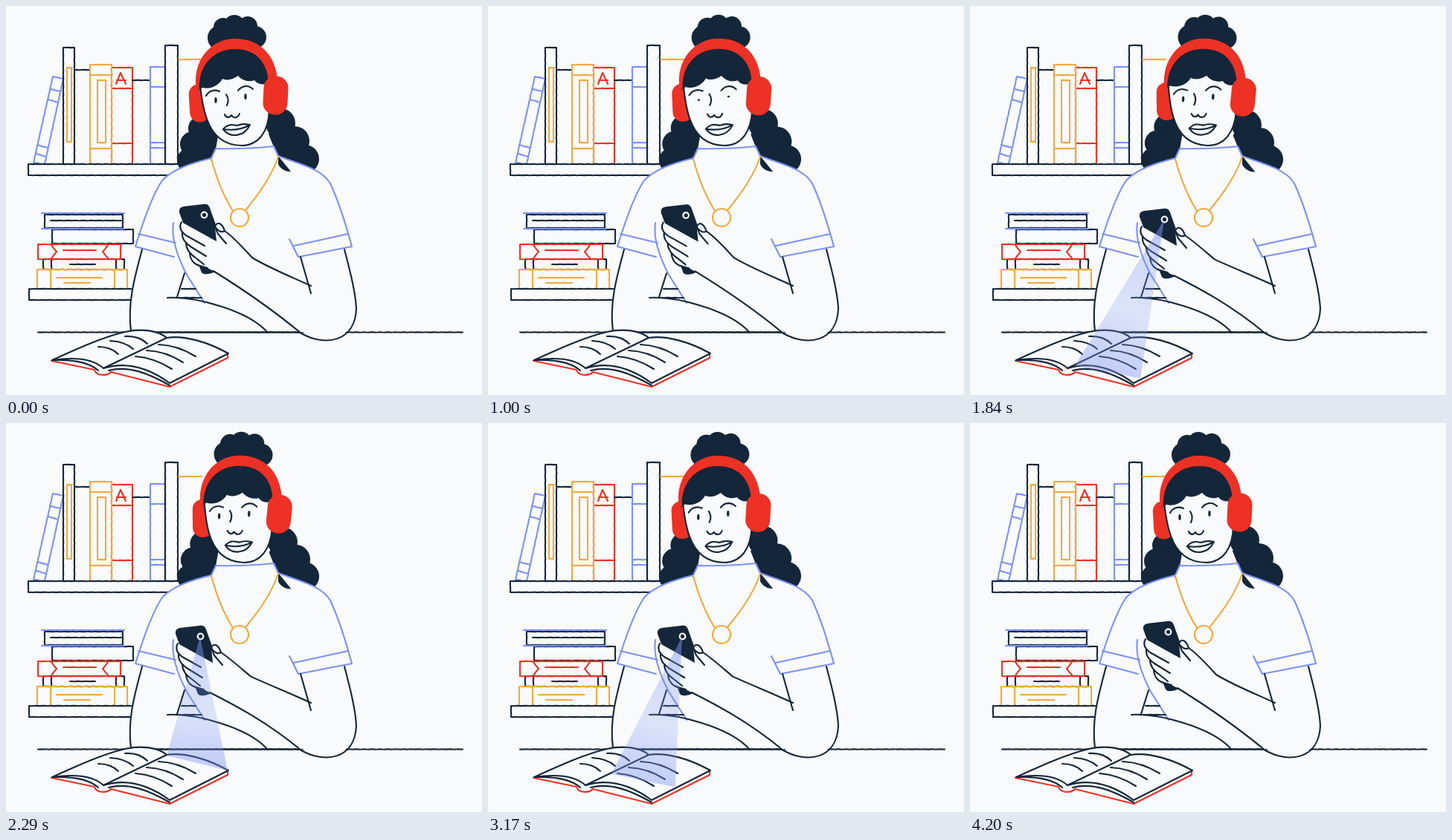
An HTML page with a canvas that plays this animation: 640x524 px, repeating every 4.32 s.

```html
<!DOCTYPE html>
<html lang="en">
<head>
<meta charset="utf-8">
<title>Reading with a phone</title>
<style>
html, body { margin: 0; width: 100%; height: 100%; overflow: hidden; background: #f8fafc; }
canvas { display: block; width: 640px; height: 524px; }
</style>
</head>
<body>
<canvas id="stage"></canvas>
<script>
const PAPER = '#f8fafc', NAVY = '#13263a', BLUE = '#7b92f4', ORANGE = '#f4a83c', RED = '#ed3124';
const LOOP = 4320;
const canvas = document.getElementById('stage');
const ctx = canvas.getContext('2d');
const dpr = window.devicePixelRatio || 1;
canvas.width = 640 * dpr;
canvas.height = 524 * dpr;

const clamp = v => Math.max(0, Math.min(1, v));
const mix = (a, b, k) => a + (b - a) * k;
const ease = (t, from, to) => (1 - Math.cos(Math.PI * clamp((t - from) / (to - from)))) / 2;

function stroke(color, d, width = 2.1) {
  ctx.strokeStyle = color;
  ctx.lineWidth = width;
  ctx.stroke(new Path2D(d));
}

function fill(color, d) {
  ctx.fillStyle = color;
  ctx.fill(new Path2D(d));
}

// Hand-inked straight lines: a faint waver along each segment.
function ink(color, pts, width = 2.1) {
  ctx.beginPath();
  ctx.moveTo(pts[0], pts[1]);
  for (let i = 2; i < pts.length; i += 2) {
    const x = pts[i - 2], y = pts[i - 1], dx = pts[i] - x, dy = pts[i + 1] - y;
    const len = Math.hypot(dx, dy), n = Math.max(1, Math.round(len / 3));
    for (let j = 1; j <= n; j++) {
      const k = j / n;
      const w = j < n ? 0.2 * Math.sin(k * len * 0.6 + x) : 0;
      ctx.lineTo(x + dx * k - dy / len * w, y + dy * k + dx / len * w);
    }
  }
  ctx.strokeStyle = color;
  ctx.lineWidth = width;
  ctx.stroke();
}

const box = (c, l, t, r, b) => ink(c, [l, t, r, t, r, b, l, b, l, t]);
const across = (c, l, r, ...ys) => ys.forEach(y => ink(c, [l, y, r, y]));
const down = (c, t, b, ...xs) => xs.forEach(x => ink(c, [x, t, x, b]));

function blobs(list, place = c => c) {
  ctx.fillStyle = NAVY;
  for (const c of list) {
    const [x, y, r] = place(c);
    ctx.beginPath();
    ctx.arc(x, y, r, 0, 7);
    ctx.fill();
  }
}

function pad(x, y, w, h, r, tilt) {
  ctx.save();
  ctx.translate(x, y);
  ctx.rotate(tilt);
  ctx.fillStyle = RED;
  ctx.beginPath();
  ctx.roundRect(-w / 2, -h / 2, w, h, r);
  ctx.fill();
  ctx.restore();
}

function upperShelf() {
  ink(BLUE, [63, 95, 77, 98, 52, 213, 37, 211, 63, 95]);
  ink(BLUE, [60, 112, 73, 115]);
  ink(BLUE, [57, 126, 70, 130]);
  ink(BLUE, [42, 187, 56, 191]);
  ink(BLUE, [40, 199, 54, 203]);
  box(NAVY, 77, 56, 92, 213);
  box(ORANGE, 82, 83, 88, 183);
  across(NAVY, 92, 113, 86);
  box(RED, 142, 83, 170, 213);
  across(RED, 142, 170, 111, 185);
  box(ORANGE, 113, 79, 142, 213);
  across(ORANGE, 113, 142, 93, 192);
  box(ORANGE, 123, 100, 134, 184);
  stroke(RED, 'M148 105L154 90L161 105M149 100L161 100');
  across(NAVY, 170, 194, 100);
  box(BLUE, 194, 82, 214, 213);
  across(BLUE, 194, 214, 109, 184, 191);
  box(NAVY, 214, 53, 231, 213);
  across(ORANGE, 232, 263, 72);
  box(NAVY, 30, 213, 260, 228);
}

function lowerShelf() {
  box(NAVY, 52, 281, 157, 299);
  across(NAVY, 60, 157, 289);
  box(NAVY, 62, 301, 171, 320);
  across(BLUE, 48, 159, 279, 300);
  box(NAVY, 50, 341, 159, 355);
  down(NAVY, 341, 355, 61, 148);
  across(NAVY, 86, 120, 348);
  box(RED, 43, 321, 154, 341);
  ink(RED, [60, 321, 68, 331, 60, 341]);
  ink(RED, [138, 321, 130, 331, 138, 341]);
  across(RED, 77, 121, 329);
  box(ORANGE, 42, 355, 163, 381);
  down(ORANGE, 355, 381, 60, 146);
  across(ORANGE, 68, 129, 366);
  across(ORANGE, 78, 113, 373);
  box(NAVY, 31, 381, 180, 396);
}

function openBook() {
  fill(PAPER, 'M61 478C95 462 130 446 160 439C182 434 205 437 216 447C240 443 272 453 299 468V474L220 513L140 495Q128 500 120 491Z');
  stroke(RED, 'M61 478L119 490Q121 497 130 497Q138 497 141 493L220 513L298 474V468');
  stroke(NAVY, 'M62 477C95 462 130 446 160 439C182 434 205 437 216 447L131 488C116 474 90 473 62 477C90 476 112 480 124 491');
  stroke(NAVY, 'M216 447C240 443 272 453 299 468L220 508C190 486 160 479 131 488M138 491C165 484 192 495 220 511');
  stroke(NAVY, 'M124 459Q141 459 151 469M140 451Q160 452 171 462M160 445Q179 444 190 455');
  stroke(NAVY, 'M174 472Q200 474 223 489M189 464Q215 465 238 480M205 456Q231 457 255 472');
}

const curls = [
  [262, 165, 17], [251, 186, 17], [247, 208, 17], [270, 190, 19], [276, 172, 14],
  [369, 158, 20], [388, 182, 20], [402, 206, 19], [368, 182, 18], [382, 205, 18]
];
const bun = [
  [288, 43, 17], [292, 29, 13], [307, 26, 14], [325, 27, 13], [335, 42, 15], [311, 42, 22]
];

function turned([x, y, r], a) {
  const k = a * clamp((215 - y) / 60);
  return [x + (224 - y) * k, y + (x - 318) * k, r];
}

function body() {
  const left = '276 205C248 212 224 220 210 235C195 257 182 298 174 324';
  const right = '366 202C397 214 424 219 436 239C448 265 458 298 465 324';
  fill(PAPER, `M${left}L183 328C172 365 163 400 168 438H397C430 460 465 450 471 410L455 327L465 324L${right}L465 324L366 324V202L360 190L350 165L286 170L282 193L276 205V324H455V410H183`);
  stroke(BLUE, `M${left}L226 338M178 307L228 319`);
  stroke(BLUE, `M276 205L282 192Q320 193 360 189L${right}L393 338L381 314M460 307L387 323`);
  stroke(BLUE, 'M225 292C222 312 229 335 243 362L267 400');
  stroke(NAVY, 'M183 328C173 365 163 400 168 438M240 360L230 392M217 393C252 391 324 409 351 439M455 328C462 355 470 385 471 408C469 453 429 459 397 441');
  across(NAVY, 236, 255, 381);
  across(NAVY, 231, 263, 393);
  across(NAVY, 168, 397, 439.5);
  stroke(ORANGE, 'M276 206C284 236 295 260 305 276M366 203C355 235 334 260 322 275');
  stroke(ORANGE, 'M302 285a12 12 0 1 0 24 0a12 12 0 1 0 -24 0');
}

function head(a, open) {
  ctx.save();
  ctx.translate(318, 224);
  ctx.rotate(a);
  ctx.translate(-318, -224);
  blobs(bun);
  pad(260, 131, 27, 51, 13, -0.06);
  const face = 'M260 96C262 120 265 138 270 152C279 178 296 188 318 188C341 187 353 168 354 140';
  fill(PAPER, face + 'V90Z');
  stroke(NAVY, face);
  fill(NAVY, 'M258 114C254 76 278 54 308 54C338 54 355 78 355 103C347 107 338 106 334 100C326 103 317 100 312 94C305 99 297 101 291 98C287 106 276 113 264 110Z');
  fill(RED, 'M256 112C250 74 275 44 308 44C345 44 362 70 365 98L353 102C351 76 336 58 308 58C279 58 258 80 260 113Z');
  pad(362.5, 120.5, 33, 52, 16, 0.05);
  stroke(NAVY, 'M269 121C273 114 280 112 287 115M312 114C317 107 326 106 332 112M296 119C300 125 299 130 297 134');
  stroke(NAVY, 'M294 146C296 151 301 151 303 147C306 152 312 151 314 145');
  stroke(NAVY, 'M292 166C299 158 305 160 311 161C317 158 323 159 328 160C320 177 301 178 292 166C305 168 318 166 328 160');
  ctx.fillStyle = NAVY;
  for (const [x, y] of [[282, 127], [322, 122]]) {
    ctx.beginPath();
    ctx.ellipse(x, y, 1.7, mix(1.2, 4, open), 0, 0, 7);
    ctx.fill();
  }
  ctx.restore();
}

function hand(k) {
  const dx = -5 * k, dy = 6 * k;
  const at = (x, y, w = 1) => `${x + dx * w} ${y + dy * w}`;
  const heel = at(279, 357);
  const bend = at(308, 375, 0.6);
  const top = `${at(294, 303)}C${at(306, 311)} ${at(318, 325, 0.7)} ${at(331, 339, 0.4)}C352 352 384 365 410 377`;

  ctx.save();
  ctx.translate(dx, dy);
  fill(NAVY, 'M233 278Q232 271 239 270L265 267Q272 266 274 272L300 345L281 358Q267 364 263 359L258 346Z');
  fill(PAPER, 'M236 291L283 317L281 297Q288 288 294 303L312 320L325 350L279 357L271 353L260 350L246 338L236 308Z');
  ctx.restore();

  fill(PAPER, `M${top}L397 441C350 402 ${bend} ${heel}Z`);
  stroke(NAVY, 'M396 338L410 387');
  stroke(NAVY, 'M' + top);
  stroke(NAVY, `M${heel}C${bend} 350 402 397 441`);

  ctx.save();
  ctx.translate(dx, dy);
  stroke(NAVY, 'M281 297C284 289 291 293 294 303C289 306 284 302 281 297L285 307L296 320');
  stroke(NAVY, 'M236 291C231 300 238 306 242 309L267 323M237 305C236 315 243 320 248 324L269 337M242 319C242 330 250 336 256 340L266 348M247 333C248 344 255 349 261 350L271 353');
  ctx.strokeStyle = '#fff';
  ctx.lineWidth = 2.2;
  ctx.beginPath();
  ctx.arc(266.5, 281.5, 3.8, 0, 7);
  ctx.stroke();
  ctx.restore();
}

function beam(sweep, reach) {
  if (reach <= 0) return;
  const x = 261, y = 288;
  const end = (lx, ly, rx, ry) => [mix(x, mix(lx, rx, sweep), reach), mix(y, mix(ly, ry, sweep), reach)];
  const [ax, ay] = end(140, 485, 216, 448);
  const [bx, by] = end(228, 502, 298, 468);
  const g = ctx.createLinearGradient(x, y, (ax + bx) / 2, (ay + by) / 2);
  const tint = a => `rgba(122,144,238,${a})`;
  g.addColorStop(0, tint(0.6));
  g.addColorStop(0.25, tint(0.32));
  g.addColorStop(0.6, tint(0.22));
  g.addColorStop(1, tint(0.42));
  ctx.fillStyle = g;
  ctx.beginPath();
  ctx.moveTo(x, y);
  ctx.lineTo(ax, ay);
  ctx.lineTo(bx, by);
  ctx.fill();
}

// The picture is held on steps whose length varies along the loop.
function held(t) {
  const spans = [[4080, 120], [3040, 130], [1840, 150], [880, 120], [0, 110]];
  const [from, step] = spans.find(s => t >= s[0]);
  return from + Math.floor((t - from) / step) * step;
}

function draw(t) {
  const tilt = 0.047 * (ease(t, 760, 1400) - ease(t, 2380, 3450));
  const lift = ease(t, 920, 1380) - ease(t, 3640, 4160);
  const sweep = ease(t, 1800, 2290) - ease(t, 2320, 2890) + ease(t, 2980, 3460);
  const reach = ease(t, 1340, 1720) - ease(t, 3430, 3820);
  const open = clamp(Math.abs(t - 1000) / 200);

  ctx.setTransform(dpr, 0, 0, dpr, 0, 0);
  ctx.fillStyle = PAPER;
  ctx.fillRect(0, 0, 640, 524);
  ctx.lineCap = ctx.lineJoin = 'round';
  upperShelf();
  lowerShelf();
  across(NAVY, 43, 614, 439.5);
  blobs(curls, c => turned(c, tilt));
  body();
  openBook();
  head(tilt, open);
  hand(lift);
  beam(sweep, reach);
}

const start = performance.now();
function tick() {
  draw(held((performance.now() - start) % LOOP));
  requestAnimationFrame(tick);
}
tick();
</script>
</body>
</html>
```
